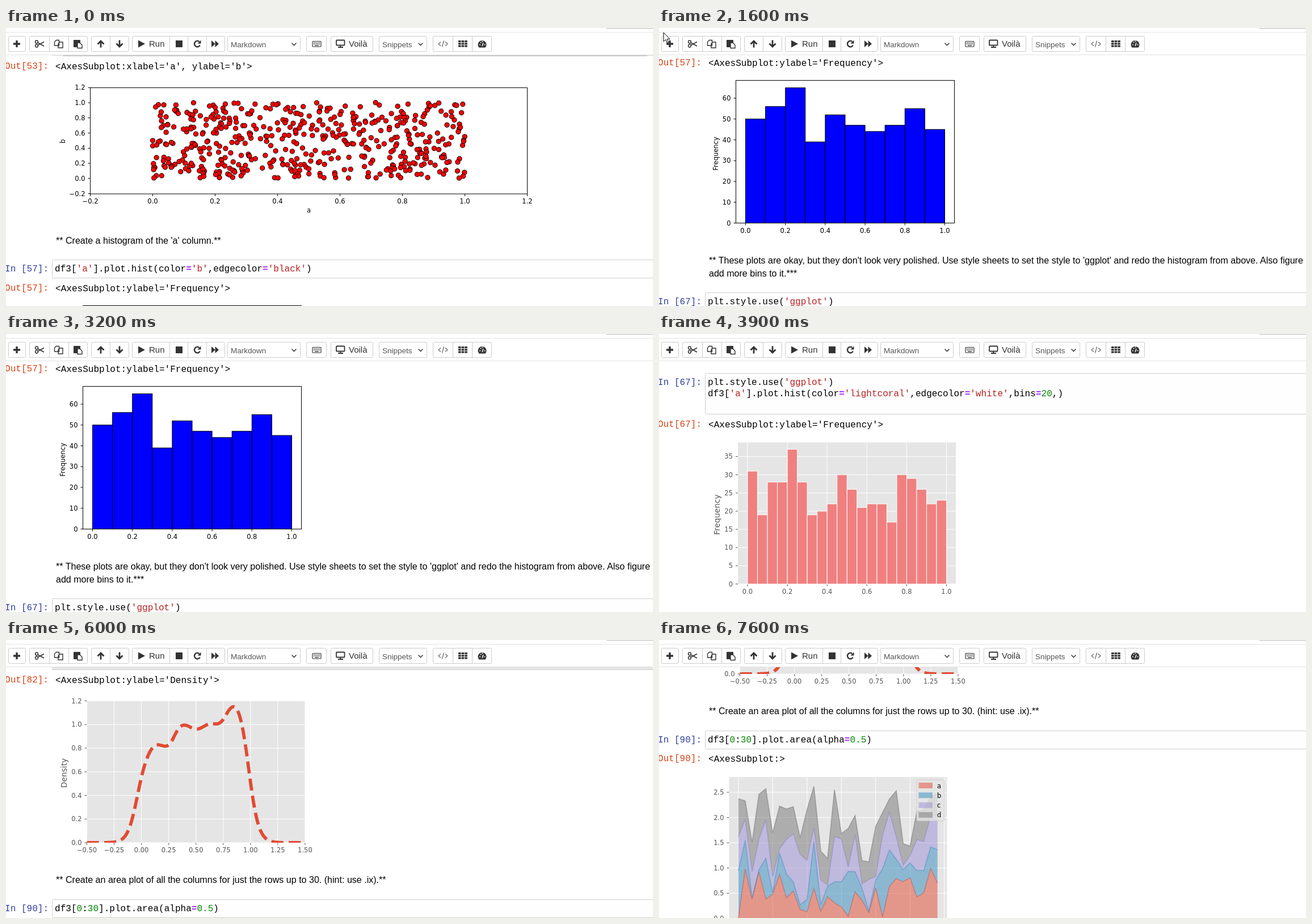
An HTML page that plays this animation: 1140x491 px, repeating every 8000 ms.

```html
<!DOCTYPE html>
<html lang="en">
<head>
<meta charset="utf-8">
<title>Notebook plots</title>
<style>
html, body { margin: 0; width: 100%; height: 100%; overflow: hidden; background: #fff; }
svg { display: block; width: 1140px; height: 491px; }
text { white-space: pre; }
.code { font: 16.06px "Liberation Mono", "Courier New", monospace; }
.note { font: 16.06px "Liberation Sans", Arial, sans-serif; }
.bar { font: 15px "Liberation Sans", Arial, sans-serif; fill: #333; }
.pick { font: 13.5px "Liberation Sans", Arial, sans-serif; fill: #555; }
.tick { font: 11.5px "DejaVu Sans", sans-serif; }
.big { font: 13.8px "DejaVu Sans", sans-serif; fill: #555; }
.gray { fill: #555; }
.mid { text-anchor: middle; }
.end { text-anchor: end; }
.str { fill: #ba2121; }
.op { fill: #a2f; font-weight: bold; }
.num { fill: #080; }
</style>
</head>
<body>
<svg viewBox="0 0 1140 491">
  <g id="page"></g>
  <g id="head"></g>
  <path id="mouse" d="M0 0v16l3.7-3.5 2.6 6 2.4-1-2.6-5.8h5z" fill="#fff" stroke="#000"/>
</svg>
<script>
const $ = id => document.getElementById(id);
const times = (n, make) => Array.from({ length: n }, (_, i) => make(i));
const random = seed => () => (seed = seed * 16807 % 2147483647) / 2147483647;
const esc = s => s.replace(/</g, '&lt;');
const text = (x, y, s, cls, more = '') => `<text x="${x}" y="${y}" class="${cls}" ${more}>${s}</text>`;
const rect = (x, y, w, h, fill, stroke = 'none', more = '') =>
  `<rect x="${x}" y="${y}" width="${w}" height="${h}" fill="${fill}" stroke="${stroke}" ${more}/>`;
const path = (d, stroke, width = 1, fill = 'none', more = '') =>
  `<path d="${d}" stroke="${stroke}" stroke-width="${width}" fill="${fill}" ${more}/>`;
const group = (y, ...parts) => `<g transform="translate(0 ${y})">${parts.join('')}</g>`;

// Notebook cells; y is the middle of the first text line
const paint = s => esc(s).replace(/('[^']*')|(=)|(\b\d[\d.]*)/g, (m, str, op) =>
  `<tspan class="${str ? 'str' : op ? 'op' : 'num'}">${m}</tspan>`);
const input = (y, n, lines, h = 33) =>
  rect(81.5, y - 15.5, 1100, h - 1, '#fefefe', '#cfcfcf', 'rx="2"') +
  text(-2, y + 5, `In [${n}]:`, 'code', 'fill="#303f9f"') +
  lines.map((s, i) => text(86, y + 5 + i * 20, paint(s), 'code')).join('');
const output = (y, n, s) =>
  text(-2, y + 5, `Out[${n}]:`, 'code', 'fill="#d84315"') + text(87, y + 6, esc(s), 'code');
const note = (y, s) => text(88, y + 5, s, 'note');
const strip = rect(81, 46, 1100, 6.5, '#e6e6e6');

// Charts
const ticks = (from, step, count, pos, gap, digits) => times(count, i =>
  [(from + i * step).toFixed(digits).replace(/^-/, '−'), pos + i * gap]);
function axes(x0, y0, x1, y1, xs, ys, gg) {
  const ink = gg ? '#555' : '#000', cls = gg ? 'tick gray ' : 'tick ';
  let out = rect(x0, y0, x1 - x0, y1 - y0, gg ? '#e5e5e5' : '#fff', gg ? 'none' : '#000');
  for (const [s, x] of xs) {
    if (gg) out += path(`M${x} ${y0}V${y1}`, '#fff');
    out += path(`M${x} ${y1}v4`, ink) + text(x, y1 + 17, s, cls + 'mid');
  }
  for (const [s, y] of ys) {
    if (gg) out += path(`M${x0} ${y}H${x1}`, '#fff');
    out += path(`M${x0} ${y}h-4`, ink) + text(x0 - 9, y + 4, s, cls + 'end');
  }
  return out;
}
const sideLabel = (x, y, s, cls) => text(0, 0, s, cls + ' mid', `transform="translate(${x} ${y}) rotate(-90)"`);
const bars = (counts, x, w, base, unit, fill, stroke) => counts.map((n, i) =>
  rect(x + i * w, base - n * unit, w, n * unit, fill, stroke)).join('');

// Column 'a' counted in twentieths; all charts of it share these counts
const bins = [31, 19, 28, 28, 37, 28, 19, 20, 22, 30, 26, 21, 22, 22, 17, 30, 29, 26, 22, 23];
const pairs = times(10, i => bins[2 * i] + bins[2 * i + 1]);

function scatter() {
  const rand = random(57);
  return bins.flatMap((n, i) => times(n, () => {
    const a = (i + rand()) / 20, b = rand();
    return `<circle cx="${258.5 + a * 550}" cy="${265.5 - b * 134}" r="4.1" fill="#f00" stroke="#000"/>`;
  })).sort((p, q) => p.slice(-60, -40) < q.slice(-60, -40) ? -1 : 1).join('');
}

// Two soft outer edges, two rises between them and a slight ripple
const rise = (x, at, steep) => 1 / (1 + Math.exp(-steep * (x - at)));
const bell = x => rise(x, -.035, 23) * rise(-x, -.988, 23) *
  (.82 + .16 * rise(x, .295, 35) + .22 * rise(x, .765, 28) + .02 * Math.cos((x - .38) * 8 * Math.PI));
function density(width, dash) {
  const line = times(201, i => [142.5 + i * 1.9225, 358 - 209 * bell(i / 100 - .5)]);
  return axes(142.5, 107.5, 527, 358, ticks(-0.5, 0.25, 9, 142.5, 48.05, 2), ticks(0, 0.2, 7, 358, -41.75, 1), true) +
    sideLabel(107, 235, 'Density', 'big') +
    '<clipPath id="box"><path d="M142 107h385v251h-385z"/></clipPath>' +
    path('M' + line.join('L'), '#e24a33', width, 'none', `clip-path="url(#box)" stroke-dasharray="${dash}"`);
}

function box(x, top, q3, med, q1, low) {
  const red = '#e24a33';
  return path(`M${x} ${top}V${q3}M${x} ${q1}V${low}M${x - 14.5} ${q3}h29V${q1}h-29z`, red, 1.2) +
    path(`M${x - 14.5} ${med}h29`, '#988ed5', 1.2) +
    path(`M${x - 7.5} ${top}h15M${x - 7.5} ${low}h15`, '#000', 1.2);
}

// Thirty random rows, stacked
const hues = ['#e24a33', '#348abd', '#988ed5', '#777'];
function area() {
  const rand = random(30);
  const rows = times(30, () => {
    let row;
    do {
      let sum = 0;
      row = [0, ...hues.map(() => sum += rand())];
    } while (row[4] > 2.67 || row[4] < 1);
    return row;
  });
  const edge = k => rows.map((row, i) => [139.8 + i * 12.1, 492 - row[k] * 89.2]);
  const fills = hues.map((c, k) =>
    path('M' + [...edge(k + 1), ...edge(k).reverse()].join('L') + 'z', 'none', 0, c, 'opacity=".5"') +
    path('M' + edge(k + 1).join('L'), c, 1.7, 'none', 'opacity=".5"'));
  const keys = hues.map((c, k) => rect(458, 252.5 + k * 17.3, 23.5, 9, c, c, 'opacity=".5"') +
    text(490, 261.5 + k * 17.3, 'abcd'[k], 'tick'));
  return fills.join('') + rect(454, 247, 48.5, 72.5, '#e5e5e5', '#ccc', 'rx="2" opacity=".8"') + keys.join('');
}

const freq = "<AxesSubplot:ylabel='Frequency'>", dens = "<AxesSubplot:ylabel='Density'>";
$('page').innerHTML = [
  group(0,
    path('M81 48.5H1140', '#ddd'), rect(101, 47, 1029, 3, '#c8c8c8'),
    output(67, 53, "<AxesSubplot:xlabel='a', ylabel='b'>"),
    axes(148.5, 105.5, 918.5, 293, ticks(-0.2, 0.2, 8, 148.5, 110, 1), ticks(-0.2, 0.2, 8, 292.5, -26.75, 1)),
    scatter(), text(533.5, 326, 'a', 'tick mid'), sideLabel(104, 200, 'b', 'tick'),
    note(376, "** Create a histogram of the 'a' column.**"),
    input(425, 57, ["df3['a'].plot.hist(color='b',edgecolor='black')"])),
  group(398,
    output(61, 57, freq),
    axes(135.5, 92.5, 520.5, 344.5, ticks(0, 0.2, 6, 152.5, 70.2, 1), ticks(0, 10, 7, 344.5, -36.75, 0)),
    bars(pairs, 152.5, 35.1, 344.5, 3.675, '#00f', '#000'), sideLabel(104, 222, 'Frequency', 'tick'),
    note(411, "** These plots are okay, but they don't look very polished. Use style sheets to set the style to 'ggplot' and redo the histogram from above. Also figure"),
    note(434, 'add more bins to it.***')),
  group(796,
    input(85, 67, ["plt.style.use('ggplot')", "df3['a'].plot.hist(color='lightcoral',edgecolor='white',bins=20,)"], 73),
    output(159, 67, freq),
    axes(139, 191.5, 523, 441.5, ticks(0, 0.2, 6, 156, 70.1, 1), ticks(0, 5, 8, 441.5, -32.15, 0), true),
    bars(bins, 156, 17.53, 441.5, 6.43, '#f08080', '#fff'), sideLabel(107, 319, 'Frequency', 'big'),
    note(508, '** Create a boxplot comparing the a and b columns.**')),
  group(1293,
    input(61, 76, ["df3[['a','b']].plot.box()"]), strip,
    output(94, 76, '<AxesSubplot:>'),
    axes(123.5, 127, 507.5, 377, [['a', 219], ['b', 411.5]], ticks(0, 0.2, 6, 366, -45.6, 1), true),
    box(219, 138, 193, 256.5, 314, 366), box(412, 139, 200, 249.5, 303.5, 363.5),
    note(443, "** Create a kde plot of the 'd' column **"),
    input(493, 78, ["df3['d'].plot.kde()"])),
  group(1750,
    output(70, 78, dens), density(2.3, 'none'),
    note(424, '** Figure out how to increase the linewidth and make the linestyle dashed.**'),
    input(474, 82, ["df3['d'].plot.density(lw=5,ls='--')"])),
  group(2188,
    strip, path('M81 52.5H1140', '#cfcfcf'),
    output(70, 82, dens), density(5.75, '21.3 9.2'),
    note(424, '** Create an area plot of all the columns for just the rows up to 30. (hint: use .ix).**'),
    input(474, 90, ['df3[0:30].plot.area(alpha=0.5)'])),
  group(2486,
    output(209, 90, '<AxesSubplot:>'),
    axes(123.5, 242, 507.5, 503, ticks(0, 5, 7, 139.8, 60.5, 0), ticks(0, 0.5, 6, 492, -44.6, 1), true),
    area())
].join('');

// Toolbar
const dark = '#333';
const button = (x0, x1, ...cuts) => rect(x0 + .5, 14.5, x1 - x0 - 1, 27, '#fff', '#ccc', 'rx="2"') +
  cuts.map(x => path(`M${x}.5 14v28`, '#ccc')).join('');
const solid = d => path(d, 'none', 0, dark);
const ring = y => `<circle cx="54" cy="${y}" r="2.4" fill="none" stroke="${dark}" stroke-width="1.5"/>`;
$('head').innerHTML = [
  rect(0, 0, 1140, 47, '#fff'),
  path('M0 7.5H1140M0 47.5H1140', '#e3e3e3'), path('M1058 .5H1140', '#bbb'),
  button(4, 35), button(41, 144, 76, 110), button(150, 217, 183), button(222, 386, 288, 320, 353),
  button(390, 519), button(529, 565), button(572, 647), button(657, 742), button(752, 856, 787, 821),
  path('M13 28h12M19 22v12', dark, 3.4),
  path('M56 26l11 6M56 30.5l11-6', dark, 1.6), ring(24.5), ring(31.5),
  path('M88.5 21.5h5V31h-8v-6.5zM94.5 25h5.500v10h-8v-7z', dark, 1.4, '#fff'),
  rect(119, 21, 12, 13, dark, 'none', 'rx="1"'), path('M126 26h4l4 4v5.500h-8z', dark, 1.4, '#fff'),
  path('M167 34.5V23M161.5 28.5l5.5-5.5 5.5 5.5M200 21.5V33M194.5 27.5l5.5 5.5 5.5-5.5', dark, 2.8),
  solid('M233 21.5l12 6.5-12 6.5z'), text(252, 33, 'Run', 'bar'),
  rect(299, 22, 12, 12, dark),
  path('M341.8 30.5A5.2 5.2 0 1 1 340.5 24', dark, 2.4), solid('M343.5 21.5v6h-6z'),
  solid('M362 22l6.5 6v-6l6.5 6-6.5 6v-6l-6.5 6z'),
  text(396, 34, 'Markdown', 'pick'), text(663, 34, 'Snippets', 'pick'),
  path('M503.5 26.5l4 4 4-4M726.5 26.5l4 4 4-4', '#444', 1.6),
  rect(540, 23.5, 15, 9.5, '#fff', dark, 'rx="1" stroke-width="1.2"'),
  path('M542 26h11M542 28.3h11', dark, 1.3, 'none', 'stroke-dasharray="1.4 1"'), path('M544 30.8h7', dark, 1.3),
  rect(582, 21.5, 14.5, 9, '#fff', dark, 'rx="1" stroke-width="1.8"'), path('M585 34h9M589.3 31v3', dark, 1.8),
  text(604, 33, 'Voilà', 'bar'),
  path('M766 24.5l-4 3.5 4 3.5M774 24.5l4 3.5-4 3.5M771.5 22.5l-3 11', '#666', 1.2),
  ...times(9, i => rect(797 + i % 3 * 5.6, 22 + Math.floor(i / 3) * 4.2, 4.6, 3.2, dark)),
  solid('M833.5 34.5a7.5 7.5 0 1 1 11 0z'),
  path('M834 29.5h2M835.5 25.5h2M838.5 23.5h2M842.5 29.5h2M839 32l2-6', '#fff', 1.4)
].join('');

const tick = 100, notch = 99.45;
const scrolls = [
  { from: 1600, to: 1600, by: 4 },
  { from: 3400, to: 3400, by: 4 },
  { from: 4900, to: 4900, by: 5 },
  { from: 5700, to: 6000, by: 9 },
  { from: 7400, to: 7600, by: 3 }];
const moves = [
  { from: 400, to: 400, a: [777, 443] },
  { from: 500, to: 600, a: [91, -13] },
  { from: 700, to: 700, a: [62, -13] },
  { from: 1600, to: 1600, a: [8, 8] },
  { from: 2800, to: 3100, a: [1103, 418], b: [0, 0] },
  { from: 3700, to: 3800, a: [26, -15], b: [20, -15] },
  { from: 4900, to: 4900, a: [27, -18] }];
const clamp = v => Math.max(0, Math.min(1, v));

function draw(now) {
  const t = Math.floor(now % 8000 / tick) * tick;
  const turns = scrolls.reduce((sum, s) => sum + s.by * clamp((t - s.from + tick) / (s.to - s.from + tick)), 0);
  $('page').setAttribute('transform', `translate(0 ${-Math.round(turns * notch)})`);
  const move = moves.find(m => t >= m.from && t <= m.to);
  $('mouse').style.display = move ? '' : 'none';
  if (move) {
    const { from, to, a, b = a } = move, k = to > from ? (t - from) / (to - from) : 0;
    $('mouse').setAttribute('transform', `translate(${a.map((v, i) => v + (b[i] - v) * k)})`);
  }
  requestAnimationFrame(draw);
}
draw(0);
</script>
</body>
</html>
```
